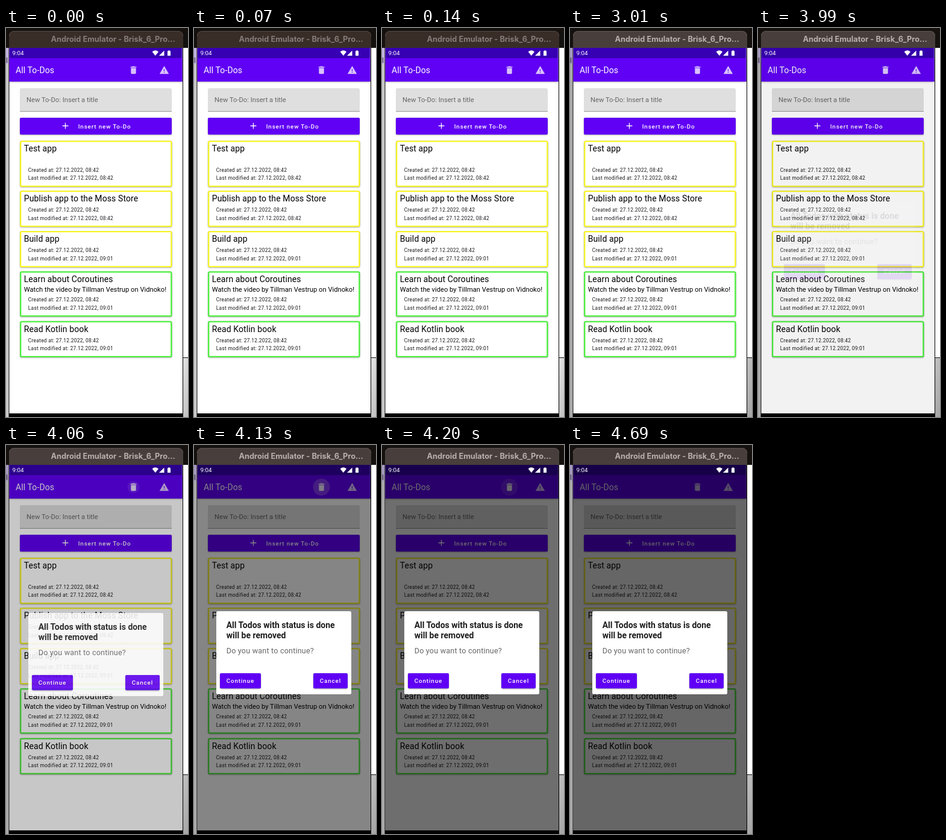
Animation, 302 px wide and 646 px high, one loop 8 s. Source, as an HTML page:

```html
<!DOCTYPE html>
<html lang="en">
<head>
<meta charset="utf-8">
<title>All To-Dos</title>
<style>
  html, body { margin: 0; width: 100%; height: 100%; overflow: hidden; background: #14110f; }
  svg { display: block; width: 100vw; height: 100vh; font-family: Roboto, "Noto Sans", sans-serif; }
  text { white-space: pre; }
  .window { font: 700 12.8px Inter, "Noto Sans", sans-serif; }
  .clock { font-size: 9.8px; fill: #fff; }
  .title { font-size: 14px; letter-spacing: .11px; }
  .body { font-size: 11.2px; }
  .meta { font-size: 8.4px; letter-spacing: .28px; fill: #1a1a1a; }
  .button { font-size: 9.8px; font-weight: 500; letter-spacing: .875px; fill: #fff; }
  .heading { font-size: 14px; font-weight: 700; fill: #1c1c1c; }
  .question { font-size: 12.6px; letter-spacing: .18px; fill: #666; }
  .raised {
    filter: drop-shadow(0 0 .6px rgba(0, 0, 0, .3)) drop-shadow(0 1px 1.2px rgba(0, 0, 0, .3));
  }
</style>
</head>
<body>
<svg id="stage" viewBox="0 0 302 646" preserveAspectRatio="none"></svg>
<script>
const LOOP = 8000, TICK = 70;
const PURPLE = '#6000f4', YELLOW = '#fffb1c', GREEN = '#46f535';

const rect = (x, y, w, h, fill, more = '') =>
  `<rect x="${x}" y="${y}" width="${w}" height="${h}" fill="${fill}" ${more}/>`;
const text = (x, y, cls, str, more = '') =>
  `<text x="${x}" y="${y}" class="${cls}" ${more}>${str}</text>`;
const button = (x, y, w, h, textX, label) =>
  rect(x, y, w, h, PURPLE, 'rx="2.2" class="raised"') +
  text(textX, y + h / 2 + 3.5, 'button', label);

function card({ top, bottom, color, title, note, edited }) {
  const day = '27.12.2022, ';
  return rect(24.3, top + 1.2, 250, bottom - top - 2.4, '#fff',
      `rx="1.8" stroke="${color}" stroke-width="2.1" class="raised"`) +
    text(29.7, top + 18, 'title', title) +
    (note ? text(29.7, top + 34, 'body', note) : '') +
    text(36.8, bottom - 25.3, 'meta', `Created at: ${day}08:42`) +
    text(36.8, bottom - 11.8, 'meta', `Last modified at: ${day}${edited}`);
}

const cards = [
  { top: 187, bottom: 264, color: YELLOW, title: 'Test app', edited: '08:42' },
  { top: 270, bottom: 330.5, color: YELLOW, title: 'Publish app to the Moss Store', edited: '08:42' },
  { top: 337, bottom: 397.5, color: YELLOW, title: 'Build app', edited: '09:01' },
  { top: 404, bottom: 479.5, color: GREEN, title: 'Learn about Coroutines',
    note: 'Watch the video by Tillman Vestrup on Vidnoko!', edited: '09:01' },
  { top: 486.5, bottom: 547, color: GREEN, title: 'Read Kotlin book', edited: '09:01' }
];

const desktop =
  '<linearGradient id="floor" x2="0" y2="1"><stop stop-color="#dedede"/>' +
  '<stop offset="1" stop-color="#c4c4c4"/></linearGradient>' +
  rect(0, 0, 302, 646, '#14110f') +
  rect(0, 33, 5, 613, '#c9c9c9') +
  rect(0, 33, 4, 27, '#c3b5e2') +
  rect(1, 49, 1, 9, '#333') +
  rect(293, 33, 9, 514, '#fff') +
  rect(293, 547, 9, 1, '#111') +
  rect(293, 548, 9, 98, 'url(#floor)') +
  '<path id="shade" d="M0 33H5V646H0ZM293 548H302V646H293Z" opacity="0"/>';

const titleBar =
  '<path id="bar" d="M5 34V13a8 8 0 0 1 8-8H286a8 8 0 0 1 8 8V34Z"/>' +
  '<path d="M5.4 13a7.6 7.6 0 0 1 7.6-7.6H286a7.6 7.6 0 0 1 7.6 7.6" ' +
  'fill="none" stroke="#fff" stroke-width=".8" opacity=".2"/>' +
  text(74.5, 23.2, 'window', 'Android Emulator - Brisk_6_Pro...', 'id="caption"');

const appBar =
  rect(5.5, 50, 287, 39, PURPLE, 'class="raised"') +
  rect(5.5, 33, 287, 17, '#3700b3') +
  text(16, 75, 'title', 'All To-Dos', 'fill="#fff"') +
  '<circle id="ripple" cx="211.5" cy="70" r="14" fill="#fff" opacity="0"/>' +
  '<path id="trash" transform="translate(203.1 61.5) scale(.7)" fill="#fff" ' +
  'd="M6 19c0 1.1.9 2 2 2h8c1.1 0 2-.9 2-2V7H6v12zM19 4h-3.5l-1-1h-5l-1 1H5v2h14V4z"/>' +
  '<path transform="translate(254.1 61.5) scale(.7)" fill="#fff" opacity=".76" ' +
  'd="M1 21h22L12 2 1 21zm12-3h-2v-2h2v2zm0-4h-2v-4h2v4z"/>';

const form =
  '<path d="M23 139V102.8a2.8 2.8 0 0 1 2.8-2.8H272.2a2.8 2.8 0 0 1 2.8 2.8V139Z" fill="#dfdfdf"/>' +
  rect(23, 138.2, 252, .8, '#888') +
  text(34, 123.2, 'body', 'New To-Do: Insert a title', 'fill="#666"') +
  button(23, 149, 252, 28, 119.7, 'Insert new To-Do') +
  '<path d="M98.5 157.6v9.8M93.6 162.5h9.8" stroke="#fff" stroke-width="1.3"/>';

const statusIcons =
  text(10.5, 45.2, 'clock', '9:04') +
  '<g fill="#fff"><path d="M242.6 39.4Q247.8 35.2 253 39.4L247.8 46Z"/>' +
  '<path d="M254 46L262.5 37.4V46Z"/>' +
  '<path d="M268 38.2h1.5v-1h2v1h1.5V46h-5Z"/></g>';

const dialog =
  rect(37, 276, 224, 138, '#fff', 'rx="2.8"') +
  text(53.7, 304.3, 'heading', 'All Todos with status is done') +
  text(53.7, 320.7, 'heading', 'will be removed') +
  text(53.7, 346, 'question', 'Do you want to continue?') +
  button(43, 379, 68, 25.2, 53.8, 'Continue') +
  button(198, 379, 57, 25.2, 208.8, 'Cancel');

document.getElementById('stage').innerHTML =
  desktop + titleBar +
  rect(4.5, 33, 289.5, 613, '#000') +
  rect(5.5, 33, 287.5, 607, '#fff') +
  appBar + form + cards.map(card).join('') +
  rect(5.5, 33, 287.5, 607, '#000', 'id="dim" opacity="0"') +
  statusIcons + `<g id="dialog">${dialog}</g>`;

const el = {};
for (const id of ['shade', 'bar', 'caption', 'ripple', 'trash', 'dim', 'dialog'])
  el[id] = document.getElementById(id);
const set = (id, attrs) => {
  for (const name in attrs) el[id].setAttribute(name, attrs[name]);
};

// Linear interpolation through [time, value] stops.
function track(t, stops) {
  let [t0, v0] = stops[0];
  for (const [t1, v1] of stops) {
    if (t < t1) return t <= t0 ? v0 : v0 + (v1 - v0) * (t - t0) / (t1 - t0);
    [t0, v0] = [t1, v1];
  }
  return v0;
}

function draw(ms) {
  const t = Math.floor(ms % LOOP / TICK) * TICK;
  const focused = t >= 3010;
  set('bar', { fill: focused ? '#483e3b' : '#392d28' });
  set('caption', { fill: focused ? '#b9b0ad' : '#867c79' });
  set('shade', { opacity: focused ? .15 : 0 });

  set('dim', { opacity: track(t, [[3920, 0], [3990, .05], [4060, .22], [4130, .48], [4200, .57], [4270, .6]]) });
  const shown = track(t, [[3920, 0], [3990, .1], [4060, .87], [4130, 1]]);
  const drop = track(t, [[3990, 13], [4060, 3], [4130, 0]]);
  set('dialog', { opacity: shown, transform: `translate(0 ${drop})` });

  set('ripple', {
    r: track(t, [[3990, 6], [4060, 10], [4130, 14]]),
    opacity: track(t, [[3990, 0], [4060, .1], [4130, .22], [4200, .12], [4270, 0]])
  });
  set('trash', { opacity: t < 3990 ? .76 : track(t, [[3990, .8], [4130, .9], [4340, .9], [4690, .76]]) });
}

const start = performance.now();
function tick() {
  draw(performance.now() - start);
  requestAnimationFrame(tick);
}
draw(0);
requestAnimationFrame(tick);
</script>
</body>
</html>
```
